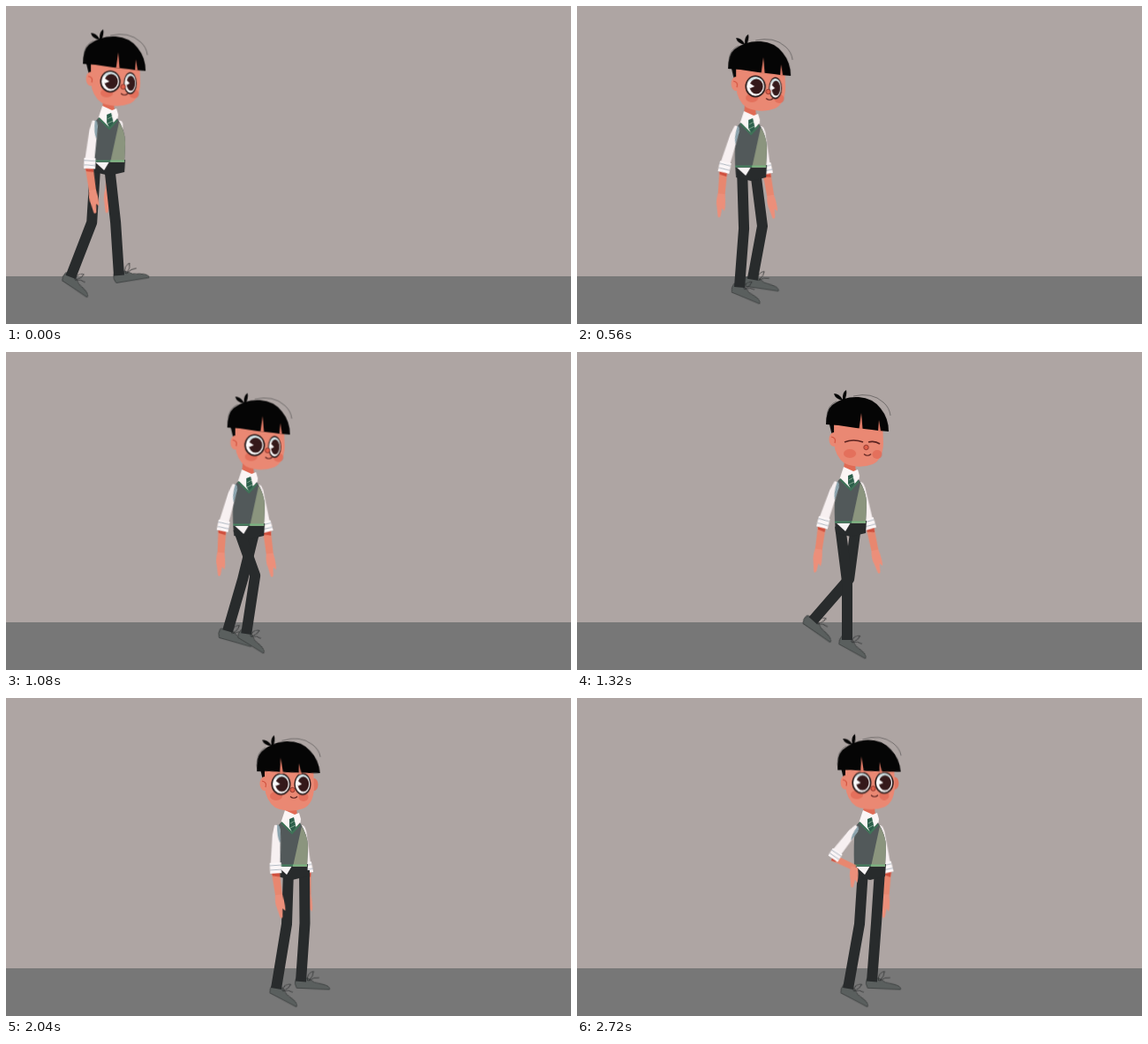
Animation of 640 by 360 pixels, one loop 4560 ms. Source, as an HTML page without scripts:

```html
<!DOCTYPE html>
<html lang="en">
<head>
<meta charset="utf-8">
<title>Walking boy</title>
<style>
html, body { margin: 0; width: 100%; height: 100%; overflow: hidden; background: #aea5a3; }
svg { display: block; width: 100vw; height: 100vh; }

.move { animation: 4560ms linear infinite; }
.torso { animation-name: torso; }
.head { animation-name: head; }
.hair { animation-name: hair; transform-origin: 318px 80px; }
.turn { animation-name: turn; }
.slits { animation-name: slits; }
.ear-r { animation-name: ear-r; }
.eye-l { animation-name: eye-l; }
.eye-r { animation-name: eye-r; }
.open { animation-name: open; animation-timing-function: step-end; }
.lids { animation-name: lids; animation-timing-function: step-end; }
.near-arm { animation-name: near-arm; }
.near-fore { animation-name: near-fore; }
.near-hand { animation-name: near-hand; }
.far-arm { animation-name: far-arm; }
.far-fore { animation-name: far-fore; }
.near-leg { animation-name: near-leg; }
.far-leg { animation-name: far-leg; }
.near-foot { animation-name: near-foot; }
.far-foot { animation-name: far-foot; }
.leg { fill: none; stroke: #282b2c; stroke-width: 12; stroke-linejoin: round; }

@keyframes torso {
  0% { transform: translate(-193px, -17px); }
  3.51% { transform: translate(-171px, -20px); }
  7.02% { transform: translate(-149.5px, -9.5px); }
  8.77% { transform: translate(-137px, -6px); }
  12.28% { transform: translate(-113px, -11px); }
  16.67% { transform: translate(-82px, -2px); }
  20.18% { transform: translate(-58px, -4px); }
  23.68% { transform: translate(-35px, 3px); }
  26.32% { transform: translate(-16px, 3px); }
  28.95% { transform: none; }
  32.46% { transform: translate(9px, -4px); }
  36.84% { transform: translate(12px, -2px); }
  44.74%, 49.12% { transform: translate(14px, -3px); }
  59.65%, to { transform: translate(22px, -3px); }
}
@keyframes head {
  0% { transform: translate(-195px, -16.5px); }
  3.51% { transform: translate(-170px, -20px); }
  7.02% { transform: translate(-146px, -9.5px); }
  8.77% { transform: translate(-134px, -6px); }
  12.28% { transform: translate(-111px, -11px); }
  16.67% { transform: translate(-81px, -2px); }
  20.18% { transform: translate(-56px, -4px); }
  23.68% { transform: translate(-31.5px, 3.5px); }
  26.32% { transform: translate(-14px, 3px); }
  28.95% { transform: none; }
  32.46% { transform: translate(6px, -3px); }
  36.84% { transform: translate(6px, -1px); }
  44.74%, 49.12% { transform: translate(2px, -2px); }
  56.14% { transform: translate(12px, -5px); }
  59.65%, to { transform: translate(13px, -3.5px); }
}
@keyframes hair {
  0%, 30.7% { transform: none; }
  39.47%, to { transform: rotate(-5deg); }
}
@keyframes turn {
  0%, 30.7% { transform: none; }
  39.47%, to { transform: translate(-5px, -2px); }
}
@keyframes slits {
  0%, 30.7% { transform: none; }
  39.47%, to { transform: translate(-12px, 0); }
}
@keyframes ear-r {
  0%, 30.7% { transform: translate(-10px, 0); }
  39.47%, to { transform: none; }
}
@keyframes eye-l {
  0%, 30.7% { transform: translate(313px, 102px); }
  39.47%, to { transform: translate(314.5px, 101.5px) scaleX(.95); }
}
@keyframes eye-r {
  0%, 30.7% { transform: translate(335.5px, 104px) scaleX(.64); }
  39.47%, 49.12% { transform: translate(339px, 101.5px) scaleX(.83); }
  59.65%, to { transform: translate(340px, 101.5px) scaleX(.92); }
}
@keyframes open {
  0% { opacity: 1; }
  27.19% { opacity: 0; }
  31.58% { opacity: 1; }
}
@keyframes lids {
  0% { opacity: 0; }
  27.19% { opacity: 1; }
  31.58% { opacity: 0; }
}
@keyframes near-arm {
  0% { transform: rotate(7deg); }
  2.63% { transform: rotate(5deg); }
  7.02% { transform: rotate(17deg); }
  10.53% { transform: rotate(22deg); }
  13.6% { transform: rotate(14deg); }
  16.67% { transform: rotate(5deg); }
  19.74% { transform: rotate(4deg); }
  23.68% { transform: rotate(16deg); }
  26.32%, 32.46% { transform: rotate(19deg); }
  36.84% { transform: rotate(17deg); }
  40.35% { transform: rotate(9deg); }
  44.74%, 49.12% { transform: rotate(2deg) scale(1, 1); }
  54.39% { transform: rotate(40deg) scale(1, .92); }
  56.14% { transform: rotate(45deg) scale(1, .88); }
  59.65%, to { transform: rotate(38deg) scale(1, .84); }
}
@keyframes near-fore {
  0% { transform: rotate(-15deg); }
  7.02% { transform: rotate(-11deg); }
  16.67% { transform: rotate(-14deg); }
  23.68% { transform: rotate(-13deg); }
  28.95% { transform: rotate(-11deg); }
  36.84% { transform: rotate(-4deg); }
  44.74%, 49.12% { transform: rotate(-10deg); }
  56.14% { transform: rotate(-95deg); }
  59.65%, to { transform: rotate(-105deg); }
}
@keyframes near-hand {
  0%, 49.12% { transform: none; }
  59.65%, to { transform: rotate(77deg); }
}
@keyframes far-arm {
  0% { transform: rotate(13deg); }
  2.63% { transform: rotate(14deg); }
  7.02% { transform: rotate(-11deg); }
  10.53% { transform: rotate(-16deg); }
  13.6% { transform: none; }
  16.67% { transform: rotate(10deg); }
  19.74% { transform: rotate(11deg); }
  23.68% { transform: rotate(-10deg); }
  26.32% { transform: rotate(-13deg); }
  28.95% { transform: rotate(-12deg); }
  44.74%, 49.12% { transform: rotate(-6deg); }
  59.65%, to { transform: rotate(-9deg); }
}
@keyframes far-fore {
  0% { transform: rotate(-9deg); }
  7.02% { transform: rotate(1deg); }
  16.67% { transform: rotate(-6deg); }
  23.68% { transform: rotate(3deg); }
  28.95% { transform: none; }
  44.74%, 49.12% { transform: rotate(5deg); }
  59.65%, to { transform: rotate(13deg); }
}
@keyframes near-leg {
  0% { d: path("M101 182L97 245L73 307"); }
  3.51% { d: path("M126 179L130 240L108 300"); }
  7.02% { d: path("M150 190L158 250L161 318"); }
  10.53% { d: path("M175 188L181 252L184 319"); }
  13.6% { d: path("M196 187L195 252L184 318"); }
  16.67% { d: path("M214 195L213 260L189 317"); }
  20.18% { d: path("M237 193L246 252L224 310"); }
  23.68% { d: path("M263 200L282 253L272 319"); }
  26.32% { d: path("M284 200L300 258L291 323"); }
  28.95% { d: path("M298 197L306 260L306 326"); }
  32.46% { d: path("M307 193L310 260L307 328"); }
  36.84% { d: path("M317 195L317 258L306 329"); }
  44.74%, 49.12% { d: path("M320 195L318 256L306 329"); }
  59.65%, to { d: path("M324 195L320 256L307 329"); }
}
@keyframes far-leg {
  0% { d: path("M117 182L124 245L128 305"); }
  3.51% { d: path("M142 179L143 245L130 306"); }
  7.02% { d: path("M167 190L166 250L137 301"); }
  10.53% { d: path("M190 188L195 248L178 304"); }
  13.6% { d: path("M211 187L221 250L214 314"); }
  16.67% { d: path("M234 195L236 255L239 319"); }
  20.18% { d: path("M257 193L256 255L243 319"); }
  23.68% { d: path("M282 200L268 257L251 316"); }
  26.32% { d: path("M301 200L290 258L256 312"); }
  28.95% { d: path("M316 197L308 257L267 304"); }
  32.46% { d: path("M326 193L332 250L304 304"); }
  36.84% { d: path("M336 195L337 258L334 321"); }
  44.74%, 49.12% { d: path("M338 195L338.5 255L334 321"); }
  59.65%, to { d: path("M343 195L339 255L334 321"); }
}
@keyframes near-foot {
  0% { transform: translate(73px, 307px) rotate(33deg); }
  3.51% { transform: translate(108px, 300px) rotate(45deg); }
  7.02% { transform: translate(161px, 318px) rotate(21deg); }
  10.53% { transform: translate(184px, 319px) rotate(20deg); }
  13.6% { transform: translate(184px, 318px) rotate(23deg); }
  16.67% { transform: translate(189px, 317px) rotate(25deg); }
  20.18% { transform: translate(224px, 310px) rotate(45deg); }
  23.68% { transform: translate(272px, 319px) rotate(31deg); }
  26.32% { transform: translate(291px, 323px) rotate(24deg); }
  28.95% { transform: translate(306px, 326px) rotate(28deg); }
  32.46% { transform: translate(307px, 328px) rotate(28deg); }
  36.84%, to { transform: translate(308px, 329px) rotate(27deg); }
}
@keyframes far-foot {
  0% { transform: translate(130px, 304px) rotate(-10deg); }
  3.51% { transform: translate(131px, 306px) rotate(5deg); }
  7.02% { transform: translate(136px, 302px) rotate(21deg); }
  10.53% { transform: translate(178px, 304px) rotate(25deg); }
  13.6% { transform: translate(214px, 314px) rotate(-5deg); }
  16.67% { transform: translate(242px, 319px) rotate(-3deg); }
  20.18% { transform: translate(245px, 319px) rotate(2deg); }
  23.68% { transform: translate(250px, 317px) rotate(15deg); }
  26.32% { transform: translate(256px, 312px) rotate(28deg); }
  28.95% { transform: translate(266px, 304px) rotate(34deg); }
  32.46% { transform: translate(304px, 304px) rotate(24deg); }
  36.84%, to { transform: translate(336px, 320px) rotate(2deg); }
}
</style>
</head>
<body>
<svg viewBox="0 0 640 360" preserveAspectRatio="none">
  <defs>
    <g id="shoe">
      <path d="M-7-2L5-3Q12 3 20 3Q29 5 28 9L-6 8.500Q-9 4-7-2Z" fill="#5a5f5e" stroke="#3a3d3d" stroke-width=".8"/>
      <path d="M5 0Q4-9 11-11Q11-5 6 0Q12-5 17-4" fill="none" stroke="#2c2d2e" stroke-width=".7"/>
    </g>
    <g id="sleeve">
      <path d="M-3-5Q3-7 4 3L5 45H-6L-5 6Z" fill="#f7f0f1"/>
      <path d="M-7 38L6 37L7 49L-6 50Z" fill="#fbf6f7"/>
      <path d="M-7 41L6 40M-6 46L7 45" stroke="#a9b1bb" stroke-width=".9"/>
    </g>
    <g id="fore">
      <path d="M-4.500-1H4.500L4 28H-4Z" fill="#e8876f"/>
      <path d="M-4.500-1H4.500L4 6L-4 4Z" fill="#cf4f3d"/>
    </g>
    <path id="hand" d="M-4-1Q-6 8-4 14L-2 25Q0 27 1 24L2 15L5 18Q6 10 4-1Z" fill="#ec8f7a"/>
    <g id="eye">
      <ellipse rx="10.8" ry="11.6" fill="#fbfafa" stroke="#2a1c1c" stroke-width="1.7"/>
      <path d="M-9-5Q-6-11 0-11Q7-10 9-5Q0-9-9-5Z" fill="#cfe0e3"/>
      <ellipse cx="1" rx="7.600" ry="8.600" fill="#35191a"/>
      <path d="M-1 0L-7-4Q-9-1-6 2Z" fill="#fbfafa"/>
    </g>
  </defs>

  <rect width="640" height="360" fill="#aea5a3"/>
  <rect y="306" width="640" height="54" fill="#777"/>

  <g class="move torso">
    <g transform="translate(322 152)"><g class="move far-arm">
      <g transform="translate(0 48)"><g class="move far-fore">
        <use href="#fore"/><use href="#hand" y="27"/>
      </g></g>
      <use href="#sleeve"/>
    </g></g>
  </g>

  <g class="move far-foot"><use href="#shoe" transform="scale(1.1 1)"/></g>
  <path class="move leg far-leg"/>
  <g class="move near-foot"><use href="#shoe"/></g>
  <path class="move leg near-leg"/>

  <g class="move torso">
    <path d="M292 191H328L327 205L310 209L293 205Z" fill="#282b2c"/>
    <path d="M293 193H310L304 203Z" fill="#f7f3f4"/>
    <path d="M303 122L315 126L316 138L302 134Z" fill="#e06a54"/>
    <path d="M302 130L313 135L318 133L320 140L319 149L309 155L297 145Z" fill="#fbf5f5"/>
    <path d="M307 140L312 138L315 151L310 155L307 149Z" fill="#2c5f4b"/>
    <path d="M308 145L313 142M308 150L314 147" stroke="#7fa48d"/>
    <path d="M298 143L310 155L319 144Q328 158 328 172L327 194H292Q291 168 293 149Z" fill="#52595a"/>
    <path d="M321 148Q328 160 328 172L327 194H311Z" fill="#8b957e"/>
    <path d="M298 144L310 156L319 146" fill="none" stroke="#3f7358" stroke-width="2.2"/>
    <path d="M292 192.500H311" stroke="#46805f" stroke-width="2"/>
    <path d="M311 192.500H327" stroke="#78b480" stroke-width="2"/>
  </g>

  <g class="move head">
    <g class="move ear-r"><ellipse cx="347" cy="100" rx="4.500" ry="7" fill="#e07661"/></g>
    <path d="M285 78H296V95H289Z" fill="#080808"/>
    <path d="M291 78H346L347 104Q346 122 335 127Q319 133 303 126Q292 118 291 102Z" fill="#ea8873"/>
    <ellipse cx="291" cy="99" rx="5.500" ry="8" fill="#ea8873"/>
    <path d="M288 96Q294 97 292 103" fill="none" stroke="#d2523f" stroke-width="1.2"/>
    <g class="move turn">
      <ellipse cx="309" cy="115" rx="7" ry="5" fill="#e0604d" opacity=".6"/>
      <ellipse cx="340" cy="116" rx="5.500" ry="5" fill="#e0604d" opacity=".6"/>
      <g class="move open">
        <g class="move eye-l"><use href="#eye"/></g>
        <g class="move eye-r"><use href="#eye"/></g>
      </g>
      <g class="move lids" fill="none" stroke="#5a2320" stroke-width="1.6">
        <path d="M303 102Q313 98 324 102M330 102Q337 100 343 104"/>
      </g>
      <circle cx="327.500" cy="108" r="2.700" fill="#e0604a" stroke="#7e2e29" stroke-width=".8"/>
      <path d="M325 115.500Q329 119 333 115.500" fill="none" stroke="#5a2320" stroke-width="1.2"/>
    </g>
    <g class="move hair">
      <path d="M282 82Q282 66 289 60Q302 50 319 51Q335 52 344 64Q353 75 353 90L341 89L334 88L316 86L296 83Z" fill="#050505"/>
      <g class="move slits" fill="#e07a66"><path d="M322 69L323.500 87H319.500ZM342 77L344 89.500H341Z"/></g>
      <path d="M301 55Q292 53 291 47Q297 47 301 54Q300 46 305 43Q306 48 303 55Z" fill="#050505"/>
      <path d="M313 50Q334 45 347 57Q354 63 355 72M283 72Q284 60 294 56" fill="none" stroke="#4a4849" stroke-width=".6"/>
    </g>
  </g>

  <g class="move torso">
    <g transform="translate(293 152)"><g class="move near-arm">
      <g transform="translate(0 48)"><g class="move near-fore">
        <use href="#fore"/>
        <g transform="translate(0 27)"><g class="move near-hand"><use href="#hand"/></g></g>
      </g></g>
      <use href="#sleeve"/>
      <path d="M0-6Q4-5 4 4V15Q0 9 0-6Z" fill="#8ba3ad"/>
    </g></g>
  </g>
</svg>
</body>
</html>
```
